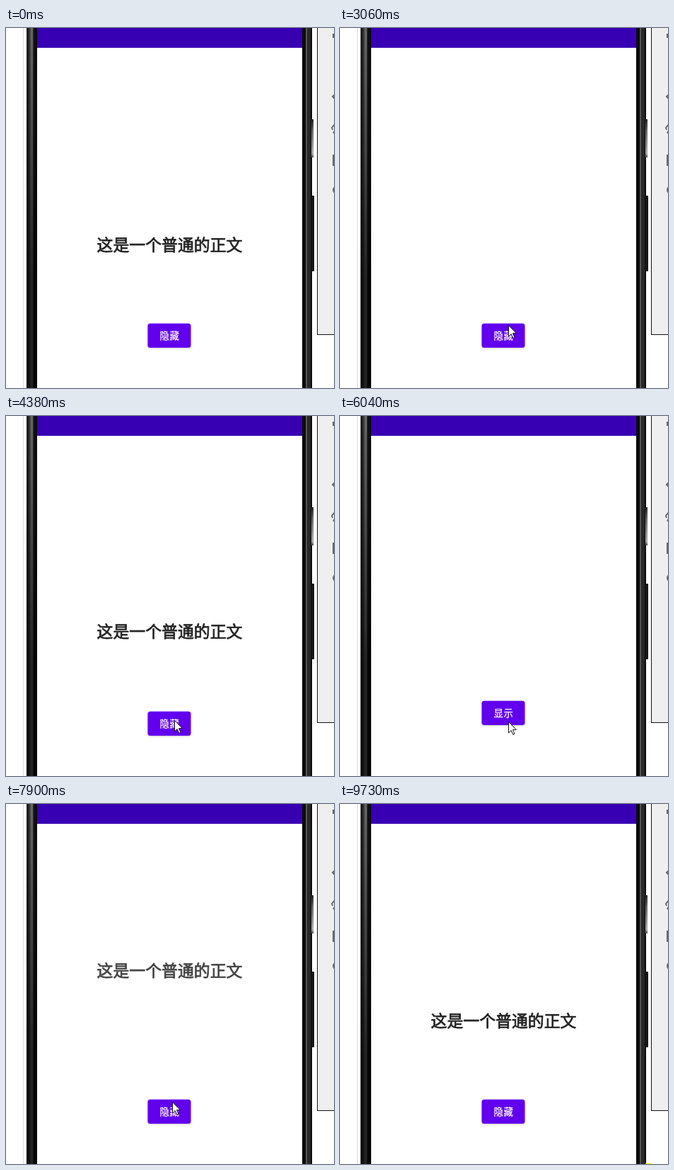
Write an HTML page that moves like this. It is 464x509 px and loops after 9.86 s.

```html
<!DOCTYPE html>
<html lang="zh-CN">
<head>
<meta charset="utf-8">
<style>
  html, body { margin: 0; width: 464px; height: 509px; overflow: hidden; background: #fff; }
  svg { display: block; }
  text { font-family: "Noto Sans CJK SC", "Noto Sans CJK", "Noto Sans CJK JP", sans-serif; }
  #title { font-size: 22.9px; font-weight: 500; fill: #222; stroke: #222; stroke-width: .75px; }
  #label { font-size: 13.4px; font-weight: 500; letter-spacing: .6px; fill: #fff; stroke: #fff; stroke-width: .25px; }
</style>
</head>
<body>
<svg width="464" height="509" viewBox="0 0 464 509">
  <defs>
    <linearGradient id="edge">
      <stop offset="0" stop-color="#333"/>
      <stop offset=".1" stop-color="#1a1a1a"/>
      <stop offset=".24" stop-color="#2a2a2a"/>
      <stop offset=".4" stop-color="#555"/>
      <stop offset=".54" stop-color="#777"/>
      <stop offset=".66" stop-color="#151516"/>
      <stop offset="1" stop-color="#08080a"/>
    </linearGradient>
    <linearGradient id="shade" x2="0" y2="1">
      <stop offset="0" stop-color="#000" stop-opacity="0"/>
      <stop offset=".7" stop-color="#000" stop-opacity=".65"/>
    </linearGradient>
    <linearGradient id="key" x2="0" y2="1">
      <stop offset="0" stop-color="#222"/>
      <stop offset=".3" stop-color="#666"/>
      <stop offset=".9" stop-color="#aaa"/>
      <stop offset="1" stop-color="#444"/>
    </linearGradient>
    <filter id="shadow" x="-20%" y="-30%" width="140%" height="170%">
      <feDropShadow dx="0" dy="1" stdDeviation=".9" flood-opacity=".22"/>
    </filter>
    <clipPath id="round"><rect x="200.5" y="417.7" width="61" height="34.3" rx="3.5"/></clipPath>
  </defs>

  <text id="title" x="128.5" y="315">这是一个普通的正文</text>
  <rect x="44" width="375" height="28" fill="#3700b3"/>

  <g id="button">
    <rect x="200.5" y="417.7" width="61" height="34.3" rx="3.5" fill="#6200ee" filter="url(#shadow)"/>
    <g clip-path="url(#round)"><circle id="ripple" cx="236" cy="435" fill="#fff"/></g>
    <text id="label" x="217.6" y="440">隐藏</text>
  </g>

  <path d="M24.5 0V509" stroke="#ddd"/>
  <rect x="29" width="15" height="509" fill="url(#edge)"/>
  <rect x="29" width="15" height="509" fill="url(#shade)"/>
  <rect x="419" width="14" height="509" fill="#0c0b0b"/>
  <rect x="424" width="2" height="509" fill="#555"/>
  <rect x="426" width="5" height="509" fill="#2a2827"/>
  <rect x="432" y="129" width="3" height="54" fill="url(#key)"/>
  <rect x="432" y="237" width="4" height="107" rx="1" fill="#181717"/>

  <rect x="440.5" y="-2" width="30" height="435.5" fill="#efefef" stroke="#111"/>
  <g fill="none" stroke="#666" stroke-width="2">
    <path d="M463 14V9H466M466 93l-4 4 4 4M465 136l-4 5 1 3M466 143l-3 6M466 180h-3v14h3"/>
    <circle cx="468" cy="229" r="5"/>
  </g>

  <rect id="glow" x="432" y="508" width="9" height="1" fill="#f6f000"/>
  <path id="cursor" d="M.5 .5V16L4.200 12.600 6.800 18.500 9 17.500 6.500 11.700H11.500Z" fill="#fff" stroke="#111"/>
</svg>
<script>
const LOOP = 9860, SLIDE = 2000, DROP = 480;
const $ = id => document.getElementById(id);
const title = $('title'), button = $('button'), label = $('label');
const ripple = $('ripple'), cursor = $('cursor'), glow = $('glow');

// hide: fade start and end; show: slide start
const hides = [[1300, 1690], [5590, 5980]];
const shows = [2538, 6758];
// press time, release time
const presses = [[1090, 1640], [2310, 2500], [5240, 5560], [6700, 6750]];
// time, x, y
const path = [
  [0, 400, 530], [40, 384, 508], [300, 330, 484], [600, 270, 456], [980, 236, 443],
  [1980, 236, 443], [2050, 236, 434], [2140, 236, 428], [2310, 236, 428],
  [2560, 238, 420], [3760, 238, 420], [4200, 238, 430], [5240, 238, 430],
  [5470, 238, 432], [6250, 238, 432], [6550, 235, 421], [8690, 235, 421],
  [8950, 290, 446], [9250, 380, 486], [9470, 434, 512]
];

const clamp = v => Math.max(0, Math.min(1, v));
const mix = (a, b, k) => a + (b - a) * k;

// cubic-bezier(.4, 0, .2, 1)
function ease(x) {
  let lo = 0, hi = 1;
  for (let i = 0; i < 24; i++) {
    const s = (lo + hi) / 2, r = 1 - s;
    if (1.2 * s * r * r + .6 * s * s * r + s ** 3 < x) lo = s; else hi = s;
  }
  return lo * lo * (3 - 2 * lo);
}

function titleState(t) {
  const i = t < hides[1][0] ? 0 : 1;
  const [from, to] = hides[i];
  if (t >= shows[i]) {
    const k = ease(clamp((t - shows[i]) / SLIDE));
    return { alpha: k, y: (k - 1) * DROP, gone: false, showing: true };
  }
  if (t < from) return { alpha: 1, y: 0, gone: false, showing: true };
  return { alpha: 1 - ease(clamp((t - from) / (to - from))), y: 0, gone: t >= to, showing: false };
}

function cursorAt(t) {
  const i = path.findIndex(p => p[0] > t);
  if (i < 0) return path[path.length - 1].slice(1);
  const a = path[i - 1], b = path[i], k = (t - a[0]) / (b[0] - a[0]);
  return [mix(a[1], b[1], k), mix(a[2], b[2], k)];
}

function draw(t) {
  const s = titleState(t);
  title.setAttribute('transform', `translate(0 ${s.y.toFixed(2)})`);
  title.setAttribute('opacity', s.alpha);
  button.setAttribute('transform', `translate(0 ${s.gone ? -15 : 0})`);
  const word = s.showing ? '隐藏' : '显示';
  if (label.textContent !== word) label.textContent = word;

  const press = presses.find(([a, b]) => t >= a && t < b + 250);
  if (press) {
    const [a, b] = press;
    ripple.setAttribute('r', mix(12, 48, clamp((t - a) / 225)));
    ripple.setAttribute('opacity', .24 * clamp((t - a) / 75) * (1 - clamp((t - b) / 250)));
  } else ripple.setAttribute('opacity', 0);

  const [x, y] = cursorAt(t).map(Math.round);
  cursor.setAttribute('transform', `translate(${x} ${y})`);
  cursor.setAttribute('visibility', t < 40 || t >= 9470 ? 'hidden' : 'visible');
  glow.setAttribute('visibility', t >= 9730 ? 'visible' : 'hidden');
}

const start = performance.now();
function tick() {
  draw((performance.now() - start) % LOOP);
  requestAnimationFrame(tick);
}
draw(0);
tick();
</script>
</body>
</html>
```
